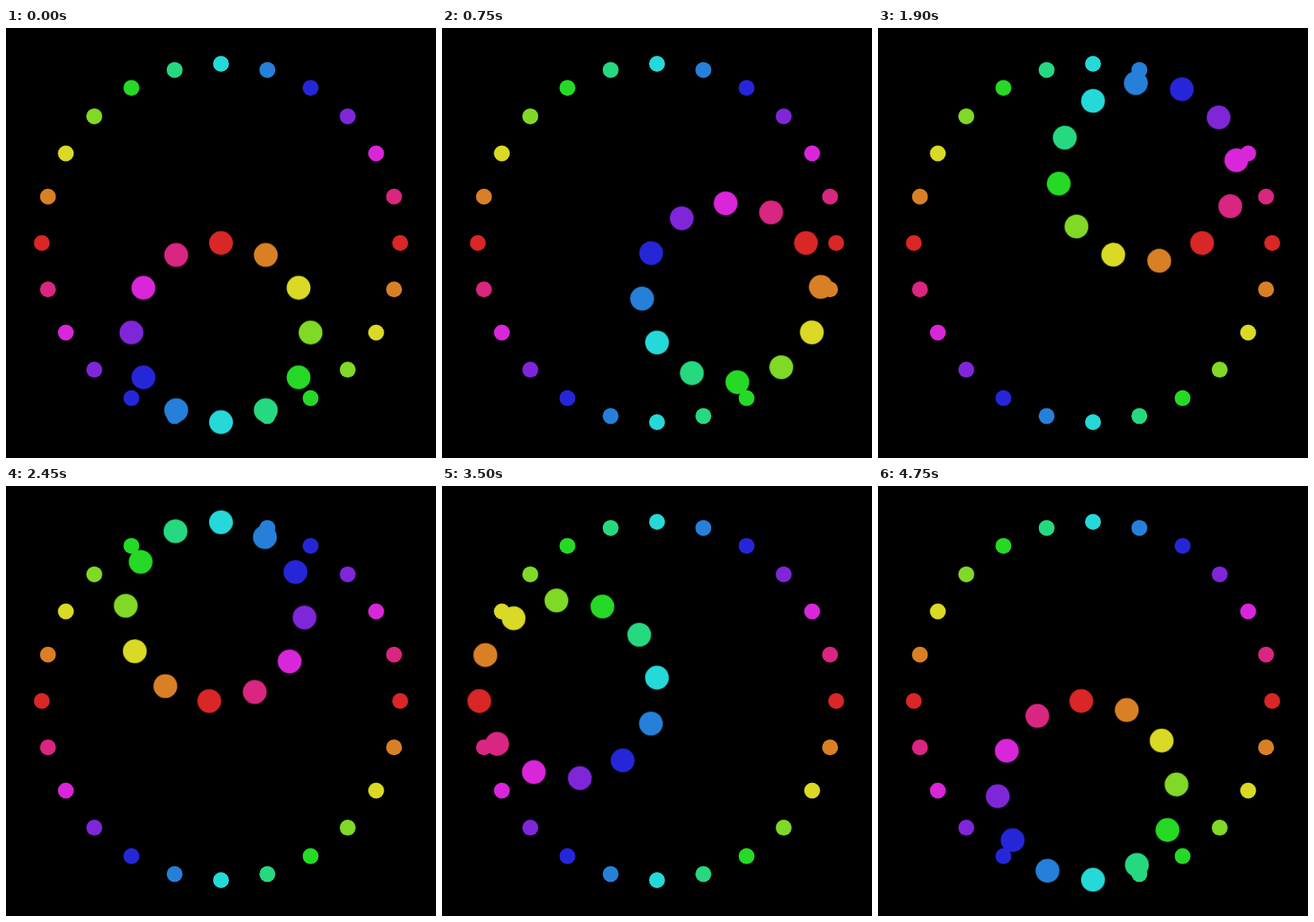
Animation, 540 px wide and 540 px high, one loop 4.8 s. Source, as an HTML page:

```html
<!DOCTYPE html>
<html lang="en">
<head>
<meta charset="utf-8">
<title>Rolling circle</title>
<style>
  html, body { margin: 0; width: 100%; height: 100%; overflow: hidden; background: #000; }
  svg { display: block; width: 100vw; height: 100vh; }

  /* The wheel's centre orbits one way while the wheel turns the other way. */
  .orbit, .wheel {
    transform-origin: 0 0;
    animation: turn 4800ms steps(96) -1ms infinite;
  }
  .orbit { --turn: -360deg; }
  .wheel { --turn: 720deg; }

  @keyframes turn {
    from { transform: rotate(0deg); }
    to { transform: rotate(var(--turn)); }
  }
</style>
</head>
<body>
<svg viewBox="0 0 540 540">
  <g transform="translate(270 270)">
    <g id="rim"></g>
    <g class="orbit">
      <g transform="translate(0 112.5)">
        <g class="wheel" id="wheel"></g>
      </g>
    </g>
  </g>
</svg>
<script>
  const SVG_NS = "http://www.w3.org/2000/svg";

  function addRing(id, { count, radius, dotRadius, startAngle }) {
    const ring = document.getElementById(id);
    for (let i = 0; i < count; i++) {
      const angle = startAngle + (i / count) * 2 * Math.PI;
      const dot = document.createElementNS(SVG_NS, "circle");
      dot.setAttribute("cx", radius * Math.cos(angle));
      dot.setAttribute("cy", radius * Math.sin(angle));
      dot.setAttribute("r", dotRadius);
      dot.setAttribute("fill", `hsl(${(i * 30) % 360}, 70%, 50%)`);
      ring.append(dot);
    }
  }

  addRing("rim", { count: 24, radius: 225, dotRadius: 10, startAngle: 0 });
  addRing("wheel", { count: 12, radius: 112.5, dotRadius: 15, startAngle: -Math.PI / 2 });
</script>
</body>
</html>
```
